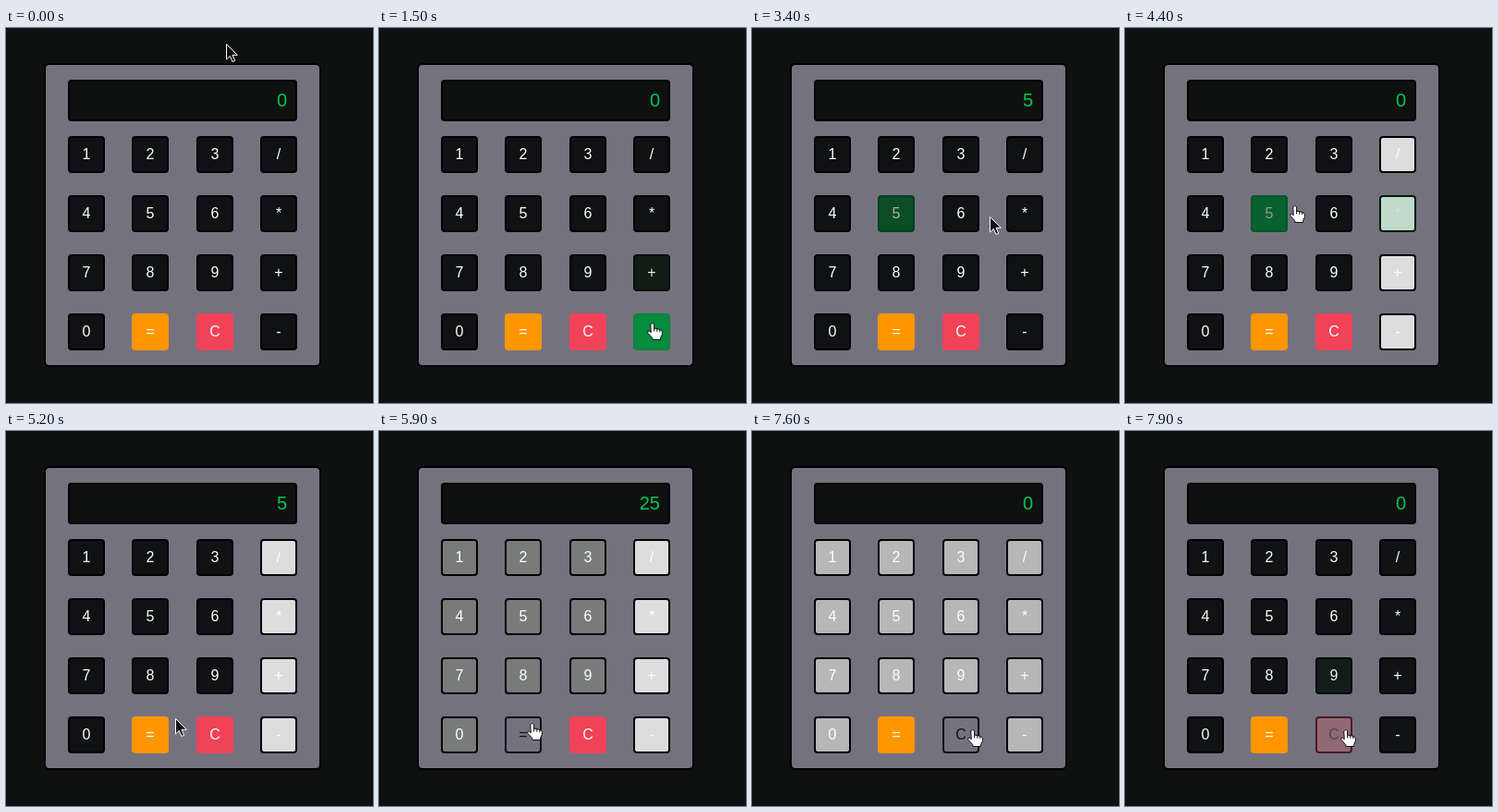
These frames come from a looping animation (397x406 px, 8000 ms). An HTML page:

```html
<!DOCTYPE html>
<html lang="en">
<head>
<meta charset="utf-8">
<title>Calculator</title>
<style>
  html, body { margin: 0; width: 100%; height: 100%; overflow: hidden; background: #0f1110; }
  svg { display: block; width: 397px; height: 406px; cursor: default; }
  text { font: 16px "Liberation Sans", Arial, sans-serif; text-anchor: middle; user-select: none; }
  #readout { font-size: 20px; text-anchor: end; fill: #00c853; }
</style>
</head>
<body>
<svg viewBox="0 0 397 406">
  <rect width="397" height="406" fill="#0f1110"/>
  <rect x="42" y="39" width="298" height="327" rx="5" fill="#757280" stroke="#000" stroke-width="2"/>
  <rect x="68" y="57" width="246" height="43" rx="3" fill="#0f1110" stroke="#000" stroke-width="2"/>
  <text id="readout" x="304" y="85">0</text>
  <g id="keys"></g>
  <g id="cursor">
    <path id="arrow" d="M.5 .5V17l3.8-3.6 2.7 6.1 2.7-1.2-2.7-6h5.3Z" fill="#111" stroke="#fff" stroke-linejoin="round"/>
    <g id="hand" stroke="#111" stroke-linejoin="round" stroke-linecap="round">
      <path d="M-2 1.6Q-.2-.8 1.6 1.6V6L8 7.4 10.4 9.4V12.5L8.6 16.4V18.5H-.2V16.6L-5.2 11.2Q-6 8.6-3.6 9.2L-2 10.6Z" fill="#fff"/>
      <path d="M1.6 6V9M4.8 7V9.4M7.8 7.6V9.8" fill="none"/>
    </g>
  </g>
</svg>
<script>
const LOOP = 8000, STEP = 100, FADE = 400;
const NS = 'http://www.w3.org/2000/svg';
const $ = id => document.getElementById(id);
const lerp = (a, b, p) => a + (b - a) * p;

// Styles hold background, border and text colours.
const DARK = [16, 17, 18], BLACK = [0, 0, 0], WHITE = [255, 255, 255];
const GREEN = [0, 200, 83], PANEL = [117, 114, 128], PALE = [221, 221, 221];
const ORANGE = [255, 150, 0], RED = [240, 67, 88];
const STYLES = {
  plain: [DARK, BLACK, WHITE],
  hover: [GREEN, GREEN, DARK],
  off: [PALE, BLACK, WHITE],
  equals: [ORANGE, ORANGE, WHITE],
  clear: [RED, RED, WHITE],
  hollow: [PANEL, DARK, DARK]
};

// Times when the pointer enters and leaves keys.
const VISITS = {
  '+': [1230, 1310],
  '-': [1345, 1960],
  '9': [2200, 2390, 7875],
  '5': [2530, 3243, 4295, 4860],
  '*': [3450, 4170],
  '=': [5330, 6612],
  'C': [6690, 7830]
};
const SHUT_OPS = 4000, SHUT_DIGITS = 5780, RESET = 7540;

const READOUT = [[0, '0'], [3100, '5'], [4000, '0'], [4700, '5'], [5800, '25'], [7600, '0']];

// Pointer moves: arrival time, x, y, and how long it rests there.
const MOVES = [
  [0, 238, 17, 500], [1200, 272, 180, 0], [1500, 296, 319, 0],
  [1700, 297, 333, 0], [2300, 236, 267, 0], [2700, 163, 205, 100],
  [2900, 152, 205, 300], [3400, 257, 204, 0], [3600, 289, 203, 0],
  [4100, 288, 205, 0], [4400, 184, 192, 0], [4700, 162, 200, 100],
  [5000, 184, 240, 0], [5300, 182, 347, 0], [5700, 166, 316, 900],
  [6700, 167, 316, 0], [7100, 239, 323, 900]
];

// CSS "ease" timing curve.
function ease(x) {
  if (x <= 0) return 0;
  if (x >= 1) return 1;
  const bez = (a, b, u) => 3 * a * u * (1 - u) ** 2 + 3 * b * u * u * (1 - u) + u ** 3;
  let lo = 0, hi = 1;
  for (let i = 0; i < 20; i++) {
    const mid = (lo + hi) / 2;
    if (bez(.25, .25, mid) < x) lo = mid; else hi = mid;
  }
  return bez(.1, 1, lo);
}

function make(tag, attrs, parent) {
  const el = document.createElementNS(NS, tag);
  for (const k in attrs) el.setAttribute(k, attrs[k]);
  return parent.appendChild(el);
}

const keys = [...'123/456*789+0=C-'].map((label, i) => {
  const x = Math.round(67 + i % 4 * 69.4), y = 117 + 64 * Math.floor(i / 4);
  const box = make('rect', { x: x + 1, y: y + 1, width: 38, height: 38, rx: 3, 'stroke-width': 2 }, $('keys'));
  const text = make('text', { x: x + 20, y: y + 25 }, $('keys'));
  text.textContent = label;

  const base = { '=': 'equals', 'C': 'clear' }[label] || 'plain';
  const over = base === 'plain' ? 'hover' : 'hollow';
  const shut = /\d/.test(label) ? SHUT_DIGITS : SHUT_OPS;
  const visits = VISITS[label] || [];
  const events = visits.map((t, j) => [t, j % 2 ? (base === 'plain' && t > shut ? 'off' : base) : over]);
  if (base === 'plain') {
    if (label !== '*') events.push([shut, 'off']);
    events.push([RESET, 'plain']);
  }
  events.sort((a, b) => a[0] - b[0]);
  return { box, text, base, visits, events };
});

// Colours at time t, each fade starting from wherever the last one had got to.
function styleAt(key, t) {
  let style = STYLES[key.base];
  key.events.forEach(([start, name], i) => {
    if (t < start) return;
    const next = key.events[i + 1];
    const end = next ? Math.min(t, next[0]) : t;
    const p = ease((end - start) / FADE);
    style = style.map((c, j) => c.map((v, k) => lerp(v, STYLES[name][j][k], p)));
  });
  return style;
}

const css = c => `rgb(${c.map(Math.round).join(',')})`;
const lastBefore = (list, t) => list.findLastIndex(e => e[0] <= t);

function draw(t) {
  for (const key of keys) {
    const [fill, edge, ink] = styleAt(key, t).map(css);
    key.box.setAttribute('fill', fill);
    key.box.setAttribute('stroke', edge);
    key.text.setAttribute('fill', ink);
  }
  $('readout').textContent = READOUT[lastBefore(READOUT, t)][1];

  const i = lastBefore(MOVES, t);
  const [at, x0, y0, rest] = MOVES[i];
  const [to, x1, y1] = MOVES[i + 1] || [LOOP, x0, y0];
  const leave = at + rest;
  const p = t <= leave ? 0 : (t - leave) / (to - leave);
  const x = Math.round(lerp(x0, x1, p)), y = Math.round(lerp(y0, y1, p));
  $('cursor').setAttribute('transform', `translate(${x} ${y})`);

  const over = keys.some(k => k.visits.filter(v => v <= t).length % 2);
  $('hand').setAttribute('visibility', over ? 'visible' : 'hidden');
  $('arrow').setAttribute('visibility', over ? 'hidden' : 'visible');
}

// The picture advances ten times a second.
const begin = performance.now();
function tick() {
  const t = (performance.now() - begin) % LOOP;
  draw(Math.floor(t / STEP) * STEP);
  requestAnimationFrame(tick);
}
tick();
</script>
</body>
</html>
```
